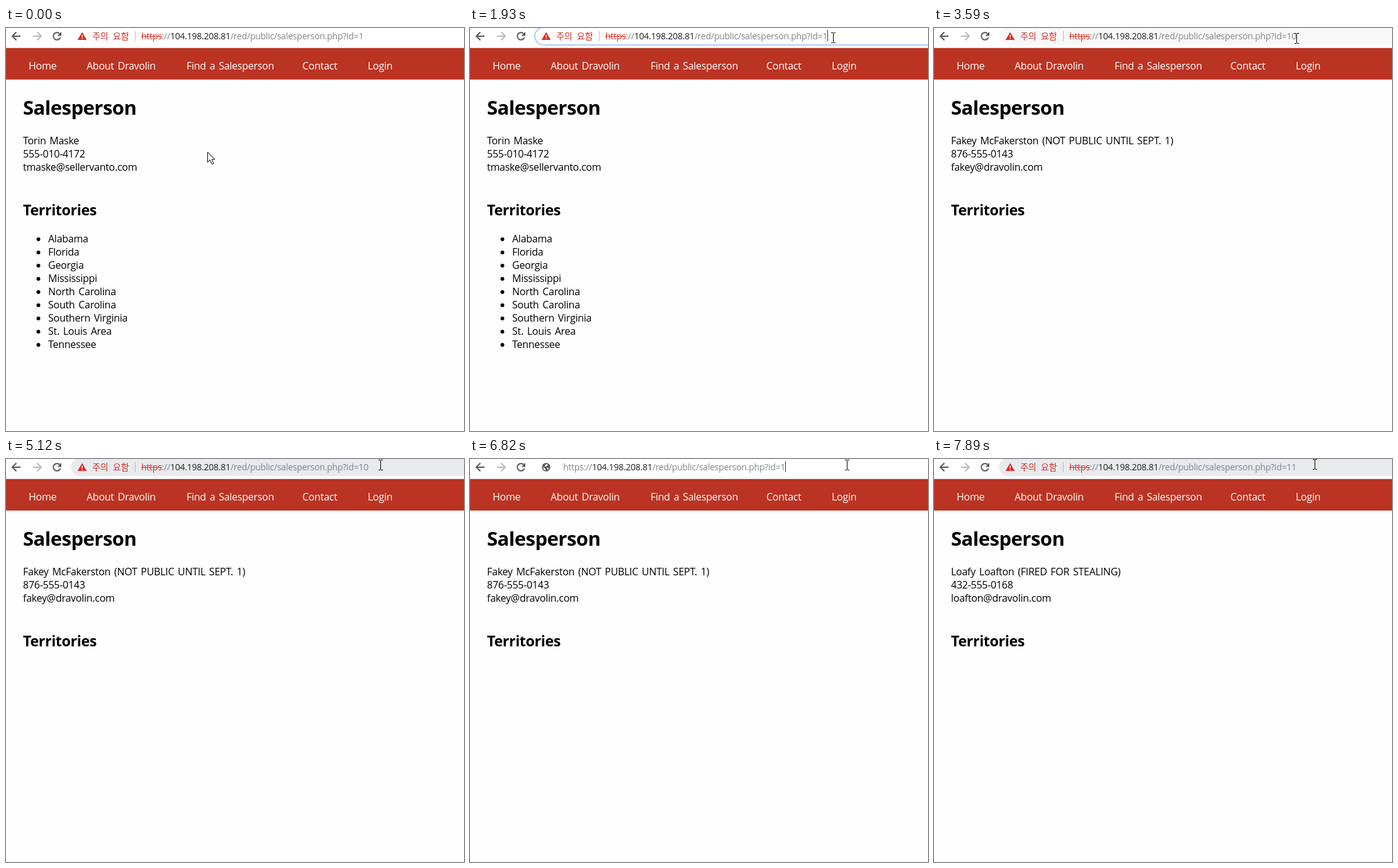
An HTML page with a canvas that plays this animation: 728x641 px, repeating every 8 s.

```html
<!DOCTYPE html>
<html lang="en">
<head>
<meta charset="utf-8">
<title>Salesperson pages</title>
<style>
  html, body { margin: 0; width: 100%; height: 100%; overflow: hidden; background: #fff; }
  canvas { display: block; }
</style>
</head>
<body>
<canvas id="stage" width="728" height="641"></canvas>
<script>
const screen2d = document.getElementById('stage').getContext('2d');
const layer = document.createElement('canvas');
layer.width = 728;
layer.height = 160;
const layer2d = layer.getContext('2d');
let ctx = screen2d;

const LOOP = 8000;
const FAMILY = '"Open Sans", "Noto Sans CJK KR", "Noto Sans CJK", sans-serif';
const RED = '#d93025', ICON = '#55595d', DARK = '#202124', GREY = '#80868b';

const HOST = '104.198.208.81';
const PATH = '/red/public/salesperson.php?id=';
const NAV = [['Home', 36], ['About Dravolin', 128], ['Find a Salesperson', 287], ['Contact', 471], ['Login', 575]];
const PAGES = [
  {
    lines: ['Torin Maske', '555-010-4172', 'tmaske@sellervanto.com'],
    areas: ['Alabama', 'Florida', 'Georgia', 'Mississippi', 'North Carolina', 'South Carolina',
      'Southern Virginia', 'St. Louis Area', 'Tennessee']
  },
  { lines: ['Fakey McFakerston (NOT PUBLIC UNTIL SEPT. 1)', '876-555-0143', 'fakey@dravolin.com'], areas: [] },
  { lines: ['Loafy Loafton (FIRED FOR STEALING)', '432-555-0168', 'loafton@dravolin.com'], areas: [] }
];

// Each step changes part of the state and holds until the next one.
const STEPS = [
  [0, { page: 0, id: '1', mode: 'secure', chip: 1, hover: 0, ring: 0, select: false, caret: false,
        popup: 0, hit: 1, loading: false, arrow: true, x: 320, y: 197 }],
  [130, { x: 432, y: 128 }],
  [250, { x: 499, y: 65 }],
  [400, { x: 540, y: 34 }],
  [520, { arrow: false, x: 560, y: 13, hover: 0.5 }],
  [650, { x: 563, y: 11, hover: 1 }],
  [790, { ring: 1, hover: 0 }],
  [940, { select: true, x: 567, y: 11 }],
  [1070, { x: 573, y: 13 }],
  [1200, { select: false, x: 578, y: 14 }],
  [1500, { x: 577, y: 15 }],
  [1930, { caret: true }],
  [2490, { id: '10', mode: 'typing', ring: 0, popup: 1 }],
  [2890, { mode: 'plain', caret: false, popup: 0.88, hover: 0.3, loading: true }],
  [3010, { page: 1, mode: 'secure', chip: 0.5, popup: 0, hover: 0, loading: false }],
  [3160, { chip: 1 }],
  [3440, { x: 576, y: 16 }],
  [3590, { hover: 0.33 }],
  [3720, { hover: 0.67 }],
  [3840, { hover: 1, x: 577, y: 15 }],
  [3980, { x: 586, y: 12 }],
  [4130, { x: 586, y: 11 }],
  [4410, { x: 589, y: 11 }],
  [4690, { x: 593, y: 11 }],
  [4840, { x: 594, y: 10 }],
  [5120, { x: 595, y: 9 }],
  [5400, { ring: 0.6, hover: 0.4 }],
  [5530, { ring: 1, hover: 0 }],
  [5830, { select: true, x: 597 }],
  [5960, { select: false, caret: true, x: 599 }],
  [6670, { id: '1' }],
  [6820, { mode: 'typing', ring: 0 }],
  [6950, { id: '11', popup: 1, hit: 2 }],
  [7090, { mode: 'plain', caret: false, loading: true }],
  [7220, { hover: 0.4 }],
  [7340, { page: 2, mode: 'secure', chip: 0.5, popup: 0, hover: 0, loading: false }],
  [7480, { chip: 1 }],
  [7890, { hover: 1, x: 605, y: 8 }]
];

function stateAt(t) {
  return Object.assign({}, ...STEPS.filter(step => step[0] <= t).map(step => step[1]));
}

function text(str, x, y, size, color, weight = 400) {
  ctx.font = `${weight} ${size}px ${FAMILY}`;
  ctx.letterSpacing = `${-0.0165 * size}px`;
  ctx.wordSpacing = `${0.12 * size}px`;
  ctx.fillStyle = color;
  ctx.fillText(str, x, y);
  return x + ctx.measureText(str).width;
}

function rect(x, y, w, h, color) {
  ctx.fillStyle = color;
  ctx.fillRect(x, y, w, h);
}

function disc(x, y, r, color) {
  ctx.fillStyle = color;
  ctx.beginPath();
  ctx.arc(x, y, r, 0, 7);
  ctx.fill();
}

function ring(x, y, r, color, width) {
  ctx.strokeStyle = color;
  ctx.lineWidth = width;
  ctx.beginPath();
  ctx.arc(x, y, r, 0, 7);
  ctx.stroke();
}

function trace(points) {
  ctx.beginPath();
  points.forEach(([x, y]) => ctx.lineTo(x, y));
}

function line(points, color, width) {
  trace(points);
  ctx.strokeStyle = color;
  ctx.lineWidth = width;
  ctx.stroke();
}

function shape(points, color) {
  trace(points);
  ctx.closePath();
  ctx.fillStyle = color;
  ctx.fill();
}

function pill(left) {
  ctx.beginPath();
  ctx.roundRect(left, -1, 760, 28, 14);
}

function navArrow(tip, dir, color) {
  line([[tip + dir, 13], [tip + 14 * dir, 13]], color, 2);
  line([[tip + 7.5 * dir, 6.5], [tip + dir, 13], [tip + 7.5 * dir, 19.5]], color, 2);
}

function reloadIcon() {
  ctx.strokeStyle = ICON;
  ctx.lineWidth = 2;
  ctx.beginPath();
  ctx.arc(81, 13, 5.8, 0.35, 5.5);
  ctx.stroke();
  shape([[88, 6], [88, 12.5], [81.5, 12.5]], ICON);
}

function stopIcon() {
  line([[76, 8], [86, 18]], ICON, 2);
  line([[86, 8], [76, 18]], ICON, 2);
}

function globe(x, y) {
  disc(x, y, 6.7, ICON);
  shape([[x - 5, y - 1], [x - 1, y + 2.5], [x - 1, y + 5.2], [x - 4, y + 3.5]], '#fff');
  shape([[x, y - 5], [x + 3, y - 4], [x + 1, y - 1.5], [x - 2.5, y - 1], [x - 1.5, y - 3]], '#fff');
  shape([[x + 1, y + 0.5], [x + 3.5, y + 1.5], [x + 4.5, y + 2.5], [x + 3, y + 4], [x + 1.5, y + 2]], '#fff');
}

function infoIcon(x, y) {
  ring(x, y, 6.1, ICON, 1.5);
  rect(x - 0.8, y - 3.5, 1.6, 1.6, ICON);
  rect(x - 0.8, y - 0.8, 1.6, 4.4, ICON);
}

function searchIcon(x, y) {
  ring(x - 1.4, y - 1.4, 3.8, GREY, 1.5);
  line([[x + 1.4, y + 1.4], [x + 5.6, y + 5.6]], GREY, 1.8);
}

function warningIcon() {
  shape([[121, 6.5], [128.3, 19], [113.7, 19]], RED);
  rect(120.3, 11, 1.5, 3.6, '#fff');
  rect(120.3, 15.8, 1.5, 1.5, '#fff');
}

function drawPage({ lines, areas }) {
  rect(0, 31, 728, 1, '#dcdcdc');
  rect(0, 32, 728, 50, '#bb3323');
  NAV.forEach(([label, x]) => text(label, x, 66, 16, '#fff'));
  text('Salesperson', 27, 138, 31, '#000', 700);
  lines.forEach((s, i) => text(s, 27, 185 + 21 * i, 16, '#000'));
  text('Territories', 27, 298, 23.25, '#000', 700);
  areas.forEach((s, i) => {
    disc(51.5, 336 + 21 * i, 3, '#000');
    text(s, 67, 341 + 21 * i, 16, '#000');
  });
}

function paintPopup(s) {
  ctx.clearRect(0, 0, layer.width, layer.height);
  ctx.save();
  ctx.shadowColor = 'rgba(0,0,0,0.32)';
  ctx.shadowBlur = 10;
  ctx.shadowOffsetY = 8;
  ctx.fillStyle = '#fff';
  ctx.beginPath();
  ctx.roundRect(97, -20, 760, 127, 8);
  ctx.fill();
  ctx.restore();

  const url = 'https://' + HOST + PATH + s.id;
  rect(97, 31, 631, 38, '#f1f3f4');
  globe(121, 50);
  const end = text(`Salesperson: ${PAGES[s.hit].lines[0]} - `, 148, 55, 14, DARK);
  text(url, end, 55, 14, '#1a6fe8', 700);
  searchIcon(121, 88);
  const tail = text(url, 148, 93, 14, DARK);
  const name = text(' - Navelo ', tail + 2, 93, 14, GREY);
  text('검색', name + 2, 93, 14.2, GREY);
}

// The popup fades as one sheet, so it is painted on its own layer first.
function drawPopup(s) {
  ctx = layer2d;
  paintPopup(s);
  ctx = screen2d;
  ctx.globalAlpha = s.popup;
  ctx.drawImage(layer, 0, 0);
  ctx.globalAlpha = 1;
}

function drawChip(progress) {
  warningIcon();
  ctx.save();
  ctx.beginPath();
  ctx.rect(137, 0, 72 * progress, 28);
  ctx.clip();
  const end = text('주의', 137, 18, 14.2, RED);
  text('요함', end + 7, 18, 14.2, RED);
  rect(205, 5, 1, 16, '#c4b4b4');
  ctx.restore();
}

function drawAddress(s) {
  const secure = s.mode === 'secure';
  const start = secure ? 137 + 78 * s.chip : s.mode === 'typing' ? 148 : 137;
  if (secure) drawChip(s.chip);
  else if (s.mode === 'typing') globe(121, 13);
  else infoIcon(121, 13);

  const parts = [['https', secure ? RED : GREY], ['://', GREY], [HOST, DARK], [PATH + s.id, GREY]];
  if (s.select) {
    const end = text(parts.map(p => p[0]).join(''), start, 18, 14, GREY);
    rect(start, 4, end - start, 18, '#0078d7');
  }
  let x = start;
  parts.forEach(([str, color], i) => {
    const next = text(str, x, 18, 14, s.select ? '#fff' : color);
    if (secure && i === 0) rect(x, 13, next - x, 1, s.select ? '#fff' : RED);
    x = next;
  });
  if (s.caret && !s.select) rect(Math.round(x), 3, 1, 18, '#333');
}

function drawToolbar(s) {
  navArrow(9, 1, ICON);
  navArrow(57, -1, '#b9bbbe');
  if (s.loading) stopIcon();
  else reloadIcon();

  if (s.hover) {
    pill(s.popup ? 104 : 103);
    ctx.fillStyle = `rgba(232,234,237,${s.hover})`;
    ctx.fill();
  }
  if (s.ring) {
    pill(103);
    ctx.strokeStyle = `rgba(174,203,250,${s.ring})`;
    ctx.lineWidth = 2;
    ctx.stroke();
  }
  drawAddress(s);
}

function drawPointer({ arrow, x, y }) {
  if (arrow) {
    const outline = [[0, 0], [0, 16], [3.8, 12.4], [6.6, 19], [9.4, 17.8], [6.6, 11.5], [11.5, 11.5]]
      .map(([dx, dy]) => [x + 0.5 + dx, y + 0.5 + dy]);
    shape(outline, '#fff');
    trace(outline);
    ctx.closePath();
    ctx.strokeStyle = '#000';
    ctx.lineWidth = 1;
    ctx.stroke();
    return;
  }
  rect(x, y - 7, 1, 15, '#000');
  for (const edge of [y - 8, y + 8]) {
    rect(x - 3, edge, 3, 1, '#000');
    rect(x + 1, edge, 3, 1, '#000');
  }
}

function draw(t) {
  const s = stateAt(t);
  rect(0, 0, 728, 641, '#fefefe');
  rect(0, 0, 728, 31, '#fff');
  drawPage(PAGES[s.page]);
  if (s.popup) drawPopup(s);
  drawToolbar(s);
  drawPointer(s);
}

const began = performance.now();
function tick() {
  draw((performance.now() - began) % LOOP);
  requestAnimationFrame(tick);
}
tick();
</script>
</body>
</html>
```
